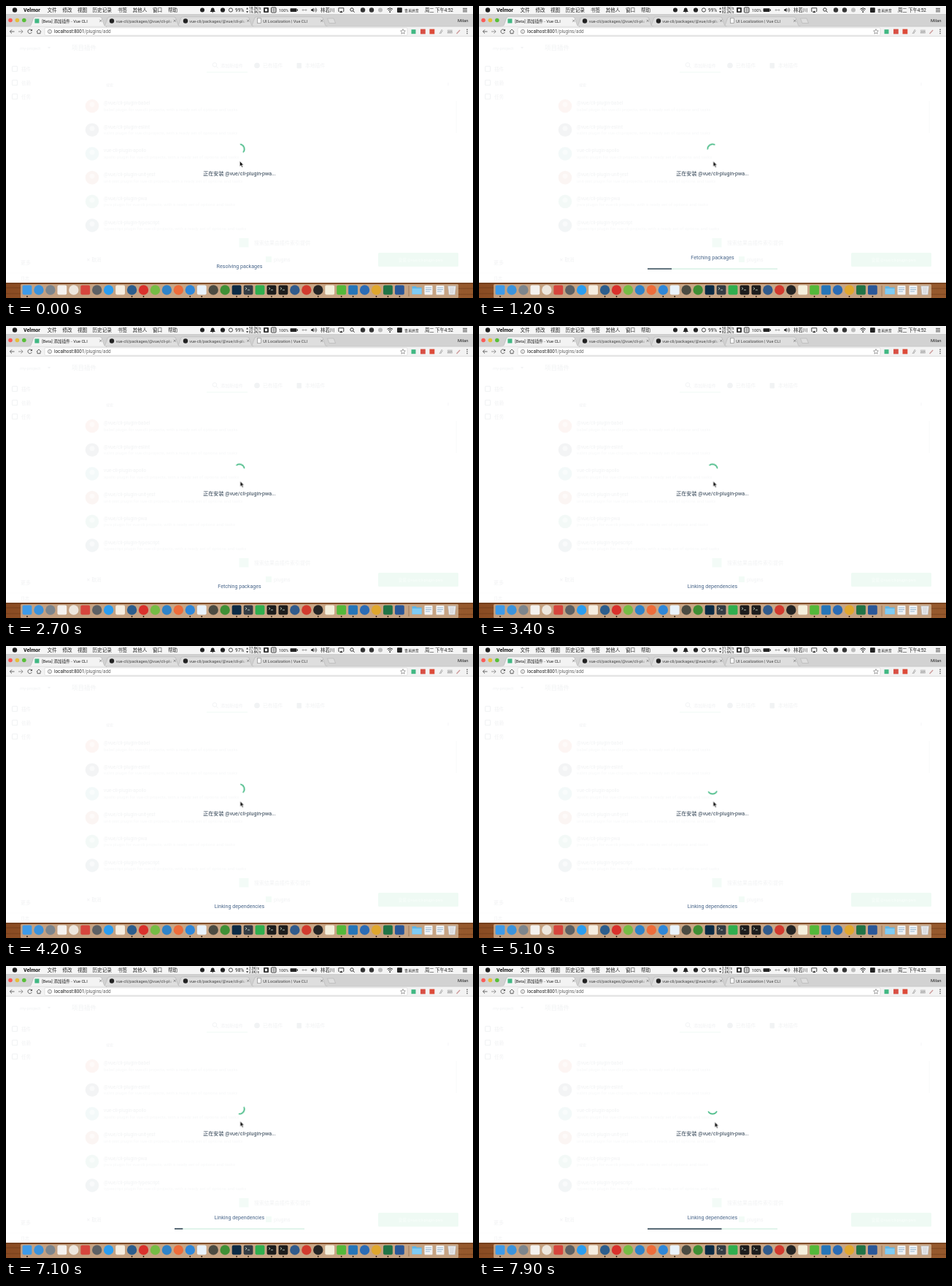
Animation of 640 by 400 pixels, one loop 8 s. Source, as an HTML page:

```html
<!DOCTYPE html>
<html lang="zh">
<head>
<meta charset="utf-8">
<title>添加插件</title>
<style>
html, body { margin: 0; width: 100%; height: 100%; overflow: hidden; background: #fff; }
svg { display: block; width: 640px; height: 400px; }
text { font-family: Roboto, "Noto Sans CJK SC", "Noto Sans CJK", sans-serif; white-space: pre; }
.spin { transform-origin: 320px 196px; animation: spin 8s steps(80) infinite; }
.fill { transform-origin: 231px 360px; animation: fill 8s infinite; }
.label { animation: lift 8s step-end infinite; }
.pointer { animation: drift 8s infinite; }
@keyframes spin { from { transform: rotate(70deg); } to { transform: rotate(4190deg); } }
@keyframes fill {
  0%, 11.25% { transform: scaleX(0); animation-timing-function: steps(16); }
  31.25% { transform: scaleX(1); animation-timing-function: step-end; }
  87.5% { transform: scaleX(0); animation-timing-function: steps(10); }
  100% { transform: scaleX(.635); }
}
@keyframes lift {
  0% { transform: translateY(12px); }
  11.25% { transform: none; }
  31.25% { transform: translateY(12px); }
  87.5%, 100% { transform: none; }
}
@keyframes drift {
  0% { transform: none; animation-timing-function: step-end; }
  12.5%, 90% { transform: translate(.6px, .2px); animation-timing-function: steps(7); }
  98.75%, 100% { transform: translate(2.7px, 1.3px); }
}
</style>
</head>
<body>
<svg id="stage" viewBox="0 0 640 400"></svg>
<script>
const LOOP = 8000;
let css = '', rules = 0;

const text = (x, y, s, size, fill = '#222', extra = '') =>
  `<text x="${x}" y="${y}" font-size="${size}" fill="${fill}" ${extra}>${s}</text>`;
const rect = (x, y, w, h, fill, extra = '') =>
  `<rect x="${x}" y="${y}" width="${w}" height="${h}" fill="${fill}" ${extra}/>`;
const dot = (x, y, r, fill, extra = '') =>
  `<circle cx="${x}" cy="${y}" r="${r}" fill="${fill}" ${extra}/>`;
const line = (d, stroke = '#555', w = 1, extra = '') =>
  `<path d="${d}" fill="none" stroke="${stroke}" stroke-width="${w}" ${extra}/>`;
const shape = (d, fill, extra = '') => `<path d="${d}" fill="${fill}" ${extra}/>`;

// Shows a piece only between two times of the loop
function during(from, to, body) {
  const name = 'on' + rules++, pc = t => t / LOOP * 100 + '%';
  const start = from ? `0%{opacity:0}${pc(from)}{opacity:1}` : '0%{opacity:1}';
  const end = to < LOOP ? `${pc(to)}{opacity:0}100%{opacity:0}` : '100%{opacity:1}';
  css += `@keyframes ${name}{${start}${end}}`;
  return `<g style="animation:${name} 8s step-end infinite">${body}</g>`;
}

// Consecutive pieces, each given as [start time, markup]
const series = items => items.map(([from, body], i) =>
  during(from, i + 1 < items.length ? items[i + 1][0] : LOOP, body)).join('');

function menuBar() {
  let s = rect(0, 0, 640, 11, '#f5f5f5') + dot(12, 5.5, 3.2, '#222');
  s += text(24, 8, 'Velmor', 7.1, '#111', 'font-weight="700"');
  const menu = [[56.5, '文件'], [77.5, '修改'], [98, '视图'], [118.5, '历史记录'],
    [153, '书签'], [173.5, '其他人'], [201, '窗口'], [222, '帮助']];
  for (const [x, word] of menu) s += text(x, 8, word, 6.6);
  s += dot(269, 5.5, 3, '#222') + dot(297, 5.5, 3.1, '#222');
  s += shape('M279.5 8q1.3-1 1.3-3a2.4 2.4 0 0 1 4.8 0q0 2 1.3 3zM282 8.6h2.4l-1.2 1z', '#222');
  s += dot(308, 5.5, 2.6, 'none', 'stroke="#333" stroke-width=".9"');
  s += series([[0, '99%'], [3500, '97%'], [6500, '98%']]
    .map(([t, v]) => [t, text(314, 8, v, 6.5)]));
  s += shape('M329.2 4.5l1.4-2.4 1.4 2.4zM329.2 7l1.4 2.4 1.4-2.4z', '#333');
  const rates = [[0, 18.2, 19.3], [700, 60.2, 82.2], [2100, 50.2, 82.2],
    [3500, 27.8, 13.8], [5000, 31.2, 21.6], [6500, '2.3', '2.0']];
  s += series(rates.map(([t, up, down]) => [t, text(333, 4.9, up + 'K/s', 4.7, '#111') +
    text(333, 9.8, down + 'K/s', 4.7, '#111')]));
  s += rect(353, 2, 7, 7, '#333', 'rx="1"') + rect(355, 3.8, 3, 3.4, '#f5f5f5');
  s += rect(363.5, 2, 6.5, 7, 'none', 'rx="1" stroke="#333"') + line('M365 4.3h3.6M365 6.7h3.6', '#333', .8);
  s += text(374, 7.6, '100%', 5.5);
  s += rect(389.5, 3.3, 9, 4.6, '#222', 'rx=".8"') + rect(399, 4.5, 1, 2.2, '#222');
  s += line('M406 5.5h6M407.5 4l-1.5 1.5 1.5 1.5M410.5 4l1.5 1.5-1.5 1.5', '#999', .8);
  s += shape('M418 4.5h1.5l2-1.8v5.6l-2-1.8H418z', '#222') + line('M423 3.7q1.5 1.8 0 3.6M424.5 2.6q2.5 2.9 0 5.8', '#222', .7);
  s += text(431, 8, '林若川', 6.4);
  s += line('M457 7.3h-1.2V2.8h7v4.5h-1.2', '#222', .8) + shape('M457 9l2.3-2.5L461.6 9z', '#222');
  s += dot(474, 5, 2.2, 'none', 'stroke="#222" stroke-width=".9"') + line('M475.6 6.6l2 2', '#222');
  s += dot(489, 5.5, 3.2, '#333') + dot(501, 5.5, 3.2, '#333') + dot(513, 5.5, 3, '#bbb');
  s += line('M522.5 4.3q3.7-3 7.4 0M523.9 6q2.3-1.8 4.6 0', '#222') + dot(526.2, 8, .9, '#222');
  s += rect(536, 2.2, 6.8, 6.8, '#222', 'rx="1"') + text(546, 7.7, '青禾拼音', 4.9);
  s += text(574, 8, '周二 下午4:52', 6.3);
  return s + line('M626 3.4h6M626 5.6h6M626 7.8h6', '#333', .9);
}

function tab(x, title, icon, active) {
  const fill = active ? '#f3f3f3' : '#dedede';
  const ink = active ? '#222' : '#444';
  return shape(`M${x} 28.2q2.5 0 3.4-2.4l3-8.6q.8-2.4 3-2.4h88q2.2 0 3 2.4l3 8.6q.9 2.4 3.4 2.4z`, fill,
      'stroke="#b2b2b2" stroke-width=".6"') + icon +
    text(x + 18.2, 22.6, title, 5.7, ink) +
    rect(x + 89, 16, 9, 10, `url(#${active ? 'fadeOn' : 'fadeOff'})`) +
    line(`M${x + 97.2} 18.8l3 3m0-3l-3 3`, '#666', .7);
}

function browserTop() {
  let s = rect(0, 11, 640, 17, '#d2d2d2') + line('M0 11.2H640', '#bdbdbd', .5);
  ['#fc5b57', '#e5bf3c', '#57c038'].forEach((c, i) => s += dot(6 + i * 9.4, 19.5, 2.8, c));
  const page = rect(344.5, 16.8, 5, 6.5, '#fff', 'stroke="#888" stroke-width=".7"');
  const repo = 'vue-cli/packages/@vue/cli-plu';
  s += tab(334, 'UI Localization | Vue CLI', page);
  s += tab(233, repo, dot(246, 20.5, 3.2, '#222'));
  s += tab(132.5, repo, dot(145, 20.5, 3.2, '#222'));
  s += shape('M440.5 17h8.5l2.6 6.5h-8.6z', '#dedede', 'stroke="#b2b2b2" stroke-width=".6"');
  s += rect(0, 28, 640, 13.5, '#f3f3f3') + line('M0 28.2H640', '#b8b8b8', .5);
  s += tab(31, '[Beta] 添加插件 - Vue CLI', rect(39.4, 17.5, 6, 6, '#41b883'), true);
  s += rect(31, 27.7, 106, 1, '#f3f3f3') + text(619, 22, 'Milan', 5.9);

  s += line('M11.5 35H5.4M8 32.4L5.4 35 8 37.6', '#555', .9);
  s += line('M17 35h6.1M20.5 32.4l2.6 2.6-2.6 2.6', '#888', .9);
  s += line('M35 33.2a2.8 2.8 0 1 0 .3 2.8', '#555', .9) + shape('M36 31.5v2.8h-2.8z', '#555');
  s += line('M41.8 35.2L45 32l3.2 3.2M43 34.8v2.9h4v-2.9', '#555', .9);
  s += rect(53, 29.8, 497, 10.4, '#fff', 'rx="1.5" stroke="#d2d2d2" stroke-width=".6"');
  s += dot(60, 35, 2.6, 'none', 'stroke="#666" stroke-width=".7"') + line('M60 34.6v1.8M60 33.3v.6', '#666', .7);
  s += text(66, 37.2, 'localhost:8001<tspan fill="#666">/plugins/add</tspan>', 6.3);
  s += shape('M544 31.6l1 2.2 2.4.3-1.8 1.6.5 2.4-2.1-1.2-2.1 1.2.5-2.4-1.8-1.6 2.4-.3z', 'none',
    'stroke="#666" stroke-width=".6"');
  s += rect(555.5, 32.2, 6, 6, '#41b883') + rect(568, 31.6, 6.8, 6.8, '#d85045') + rect(580.5, 31.6, 6.8, 6.8, '#dd4b39');
  s += line('M594 38l3.5-6M598.5 33.5l-3 4.5', '#999', .8);
  s += rect(604.8, 32.6, 7, 5.2, '#c9c9c9', 'rx=".5"') + line('M605 37l2-2 1.6 1.4 1.5-2 1.5 2', '#999', .6);
  s += line('M617.5 38l4.6-5', '#c99', 1.3);
  [32.4, 35, 37.6].forEach(y => s += dot(632, y, .8, '#555'));
  return s + line('M0 41.3H640', '#c9c9c9', .6);
}

// The plugin list, seen faintly behind the white overlay
function pageBehind() {
  const ink = '#2c3e50';
  let s = rect(0, 47, 640, 21, '#42b983', 'opacity=".05"');
  s += text(19, 59.5, 'my-project', 6, ink) + shape('M57 56l2 2.4 2-2.4z', ink) + text(90, 60, '项目插件', 8.5, ink);
  ['插件', '依赖', '任务'].forEach((word, i) => {
    const y = 86 + i * 19;
    s += rect(8.5, y - 3.5, 7, 7, 'none', `rx="1" stroke="${ink}" stroke-width="1.2"`) + text(21, y + 2.5, word, 6.6, ink);
  });
  s += dot(286, 80.5, 2.8, 'none', `stroke="${ink}"`) + line('M288 82.5l2.8 2.8', ink) + text(294, 84, '添加新插件', 6.2, ink);
  s += dot(344, 81.5, 3.8, ink) + text(352, 84, '已有插件', 6.8, ink);
  s += rect(398.5, 78, 6.5, 7.5, ink, 'rx="1"') + text(410, 84, '本地插件', 6.8, ink);
  s += rect(275, 90, 56, 1.2, '#42b983') + text(137, 110, '搜索', 5, ink) + line('M606 105v4', ink, .8);
  const plugins = [['babel', '#d8532b'], ['eslint', '#2c3e50'], ['apollo', '#2a9d8f'],
    ['unit-jest', '#c0562c'], ['pwa', '#2a9d7a'], ['typescript', '#204e60']];
  plugins.forEach(([name, color], i) => {
    const y = 137 + i * 32.7;
    s += dot(118, y, 9.3, color, 'opacity=".85"') + dot(118, y - 2, 3.4, '#fff', 'opacity=".5"');
    s += text(134, y - 2, (i === 2 ? 'vue-cli-plugin-' : '@vue/cli-plugin-') + name, 6.6, ink);
    s += text(134, y + 6.5, `${name} plugin for vue-cli projects, with a ready set of options and tasks`, 6, ink, 'opacity=".6"');
  });
  s += rect(616.5, 130, 1.5, 44, ink, 'opacity=".3"');
  s += rect(319.5, 318, 13, 12.5, '#42b983') + text(340, 326.5, '搜索结果由插件索引提供', 7, ink);
  s += text(110, 349.5, '✕ 取消', 6.6, ink) + rect(356, 343, 8, 8, '#42b983') + text(367, 349.5, 'plugins', 7, ink);
  s += text(20, 354, '更多', 7, ink) + text(20, 374.5, '日志', 6, ink) + line('M0 366H640', ink, .5, 'opacity=".4"');
  return rect(0, 41.6, 640, 338, '#fff') + `<g opacity=".065">${s}</g>` +
    rect(510, 338, 110, 19, '#effaf4', 'rx="1.5"') + text(538, 350, '安装 @vue/cli-plugin-pwa', 5.4, '#fafffc');
}

function progress() {
  const label = s => text(320, 347.3, s, 7.1, '#49668a', 'text-anchor="middle"');
  const labels = series([[0, label('Resolving packages')], [800, label('Fetching packages')],
    [3400, label('Linking dependencies')]]);
  const bar = rect(231, 359.4, 178, 1.5, '#d7f1e5') + rect(231, 359.4, 178, 1.5, '#2c3e50', 'class="fill"');
  return line('M314.1 193a6.6 6.6 0 0 1 11.8 0', '#42b983', 1.6, 'class="spin"') +
    text(320, 231.7, '正在安装 @vue/cli-plugin-pwa...', 7.1, '#2c3e50', 'text-anchor="middle"') +
    `<g class="label">${labels}</g>` + during(900, 2500, bar) + during(7000, LOOP, bar);
}

function dock() {
  let s = rect(0, 379, 640, 21, 'url(#wood)') + line('M0 380H640', '#5b3219', 1.5, 'opacity=".6"');
  s += line('M0 386H22M0 394H22M618 387H640M618 395H640', '#5e3316', 1, 'opacity=".5"');
  s += rect(20, 381, 600, 19, '#d9bfa4', 'rx="1.5" opacity=".72"');
  // A leading "o" marks a round icon, "t" a terminal window
  const icons = `#3f9be8 o#3b93dc o#7d858c #f4f1ee o#ede6dd #d6453d o#5d6165 o#2a9df0 #f5ede0
    o#2c5d8c o#d9302b o#76bc45 o#2f83c8 o#ee6c3a o#2f87d8 #e9f2fa o#4b4b42 o#3f8f35 #0c2b45
    t#333c44 #2fae4e t#1c1c1c t#1c1c1c o#315b8c o#d23a2e o#252525 #f4efdc #53b83a #2575b8
    o#2b6cb5 o#e0a72e #207346 #2a5798`.split(/\s+/);
  const running = [0, 9, 10, 14, 15, 18, 19, 21, 22, 25, 27, 28, 30, 31, 32];
  icons.forEach((code, i) => {
    const x = 29 + i * 15.95, color = code.slice(code.indexOf('#'));
    s += code[0] === 'o' ? dot(x, 389, 6.7, color) : rect(x - 6.4, 382.6, 12.8, 12.8, color, 'rx="2"');
    if (code[0] === 't') s += line(`M${x - 4} 385.5l2 1.6-2 1.6M${x - 1} 389h3`, '#d5e5d5', .8);
    if (running.includes(i)) s += dot(x, 398, .9, '#2a1a10');
  });
  s += line('M552 383V398', '#8b6b50', .7);
  s += shape('M556.6 384h5l1.4 1.6h6.6v9.2h-13z', '#5fb6e8') + rect(556.6, 387, 13, 7.8, '#7ecbf4');
  for (const x of [573.5, 589.5])
    s += rect(x, 383, 11, 12.5, '#f1f3f5', 'rx=".8"') +
      line(`M${x + 1.5} 386h8M${x + 1.5} 388.5h8M${x + 1.5} 391h6`, '#8fb1cf', .9);
  s += shape('M605.6 383.5h11l-1.4 12h-8.2z', '#e9eaec', 'stroke="#b5b5b8" stroke-width=".6"');
  return s + line('M609 385l.6 9M611.1 385v9M613.2 385l-.6 9', '#bfc2c6', .6);
}

const fade = (id, c) => `<linearGradient id="${id}"><stop stop-color="${c}" stop-opacity="0"/>
  <stop offset=".8" stop-color="${c}"/></linearGradient>`;
const defs = `<defs>${fade('fadeOn', '#f3f3f3')}${fade('fadeOff', '#dedede')}
  <linearGradient id="wood"><stop stop-color="#8a4b22"/><stop offset=".5" stop-color="#a5693c"/>
  <stop offset="1" stop-color="#95582c"/></linearGradient></defs>`;
const pointer = shape('M320.4 212.6v7.2l1.7-1.5 1.2 2.7 1.2-.5-1.2-2.7h2.2z', '#111',
  'class="pointer" stroke="#fff" stroke-width=".5"');

document.getElementById('stage').innerHTML =
  defs + pageBehind() + browserTop() + menuBar() + dock() + progress() + pointer;
const style = document.createElement('style');
style.textContent = css;
document.head.append(style);
</script>
</body>
</html>
```
